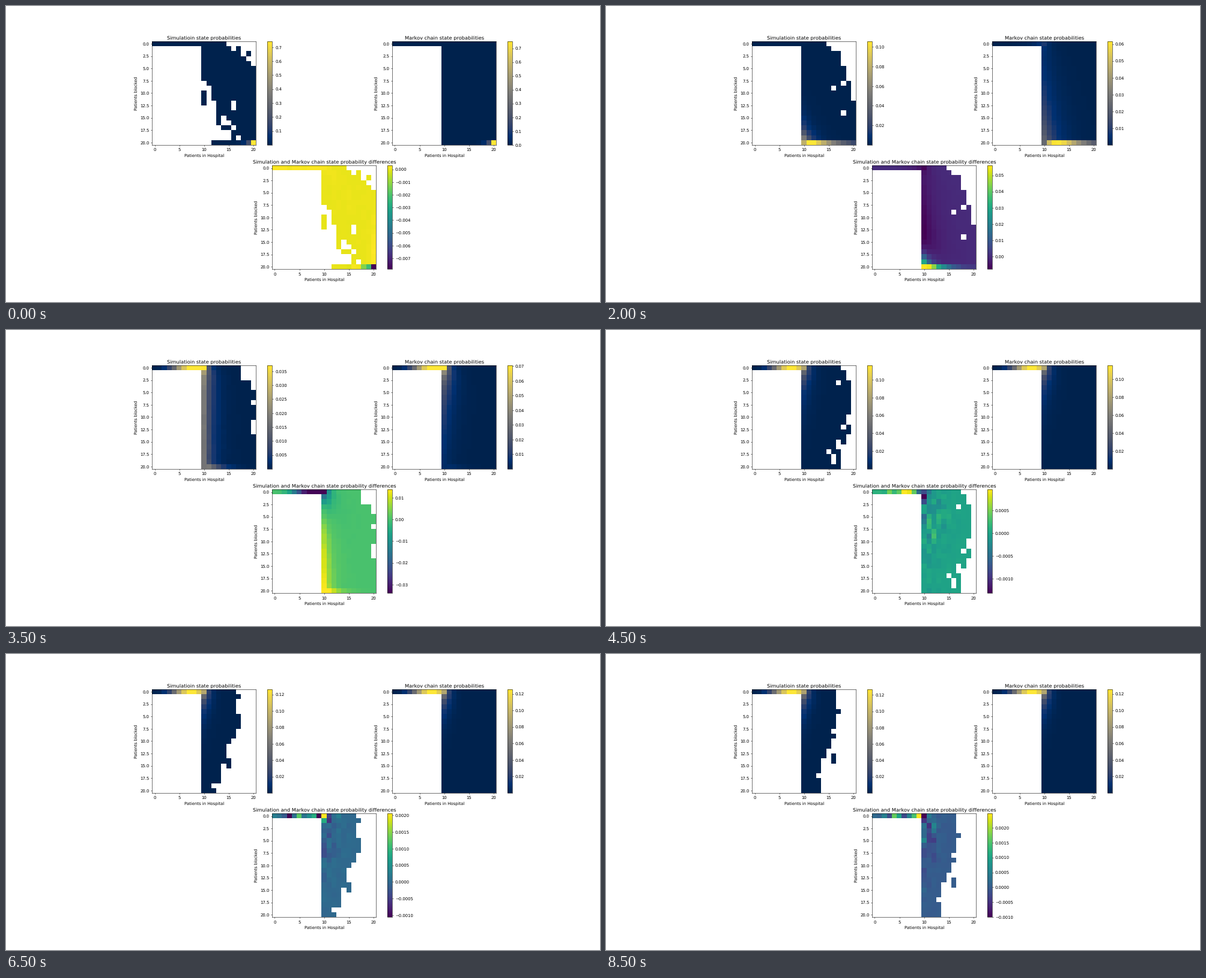
These frames come from a looping animation (989 by 494 pixels, 10 s). A matplotlib script:

```python
import numpy as np
import matplotlib.pyplot as plt
from matplotlib.animation import FuncAnimation

WIDTH, HEIGHT, DPI = 989, 494, 49.45
SIZE = 21                # states 0..20 on both axes
THRESHOLD = 10           # arrivals of the second kind are blocked from here on
ARRIVALS = 4             # rate of each arrival stream, service rate is 1
LAST_SERVERS = 18

STOP_RATE = 0.0015       # inverse of the mean length of a simulation run
RARE = 6e-6              # states less likely than this tend to go unseen
SAMPLING = 0.003         # scale of the sampling error

STATES = [(v, u) for v in range(SIZE) for u in range(SIZE)
          if v == 0 or u >= THRESHOLD]
INDEX = {s: i for i, s in enumerate(STATES)}


def generator(servers, release):
    """Rate matrix; release is the rate that frees a blocked patient."""
    q = np.zeros((len(STATES), len(STATES)))

    def link(a, b, rate):
        q[INDEX[a], INDEX[b]] += rate
        q[INDEX[a], INDEX[a]] -= rate

    for v, u in STATES:
        if u < SIZE - 1:
            link((v, u), (v, u + 1), ARRIVALS)
        if u < THRESHOLD:
            link((v, u), (v, u + 1), ARRIVALS)
        elif v < SIZE - 1:
            link((v, u), (v + 1, u), ARRIVALS)
        if v and u == THRESHOLD:
            link((v, u), (v - 1, u), release)
        elif u:
            link((v, u), (v, u - 1), min(u, servers))
    return q


def to_grid(p):
    grid = np.full((SIZE, SIZE), np.nan)
    grid[tuple(np.transpose(STATES))] = p
    return grid


def steady_state(q):
    a = q.T.copy()
    a[-1] = 1
    return to_grid(np.linalg.solve(a, np.eye(len(q))[-1]))


def run_average(q):
    """Expected share of time per state in a run that starts empty."""
    unit = np.eye(len(q))
    return to_grid(np.linalg.solve(STOP_RATE * unit - q.T, STOP_RATE * unit[0]))


def streaky_noise(rng):
    """Normal noise, correlated down the columns."""
    noise = rng.normal(size=(SIZE, SIZE))
    noise[1:] = 0.8 * noise[1:] + 0.6 * noise[:-1]
    return noise


def scene(servers):
    rng = np.random.default_rng(servers)
    markov = steady_state(generator(servers, THRESHOLD))
    mean = run_average(generator(servers, min(servers, THRESHOLD)))

    error = SAMPLING * streaky_noise(rng) * np.sqrt(mean * (1 - mean))
    seen = mean > RARE * np.exp(0.8 * streaky_noise(rng))
    simulated = np.where(seen, np.maximum(mean + error, 1e-6), np.nan)
    return simulated, markov, simulated - markov


SCENES = [scene(c) for c in range(1, LAST_SERVERS + 1)]

plt.rcParams["text.hinting"] = "none"
# The tiny surplus keeps rounding from losing a pixel.
fig = plt.figure(figsize=((WIDTH + 1e-6) / DPI, (HEIGHT + 1e-6) / DPI), dpi=DPI)
# Nudge the default margins so that the frames snap to the right pixels.
dx, dy = -0.6 / WIDTH, 0.3 / HEIGHT
fig.subplots_adjust(left=0.125 + dx, right=0.9 + dx,
                    bottom=0.11 + dy, top=0.88 + dy)


def heatmap(cell, title, data, cmap):
    ax = plt.subplot2grid((2, 4), cell, colspan=2, fig=fig)
    image = ax.imshow(data, cmap=cmap)
    ax.set_title(title)
    ax.set_xlabel("Patients in Hospital")
    ax.set_ylabel("Patients blocked")
    fig.colorbar(image, ax=ax)
    return image


PANELS = [
    ((0, 0), "Simulatioin state probabilities", "cividis"),
    ((0, 2), "Markov chain state probabilities", "cividis"),
    ((1, 1), "Simulation and Markov chain state probability differences",
     "viridis"),
]
images = [heatmap(cell, title, data, cmap)
          for (cell, title, cmap), data in zip(PANELS, SCENES[0])]


def update(step):
    # The last scene is held for the rest of the loop.
    for image, data in zip(images, SCENES[min(step, LAST_SERVERS - 1)]):
        image.set_data(data)
        image.set_clim(np.nanmin(data), np.nanmax(data))
    return images


anim = FuncAnimation(fig, update, frames=20, interval=500, repeat=True)
plt.show()
```
